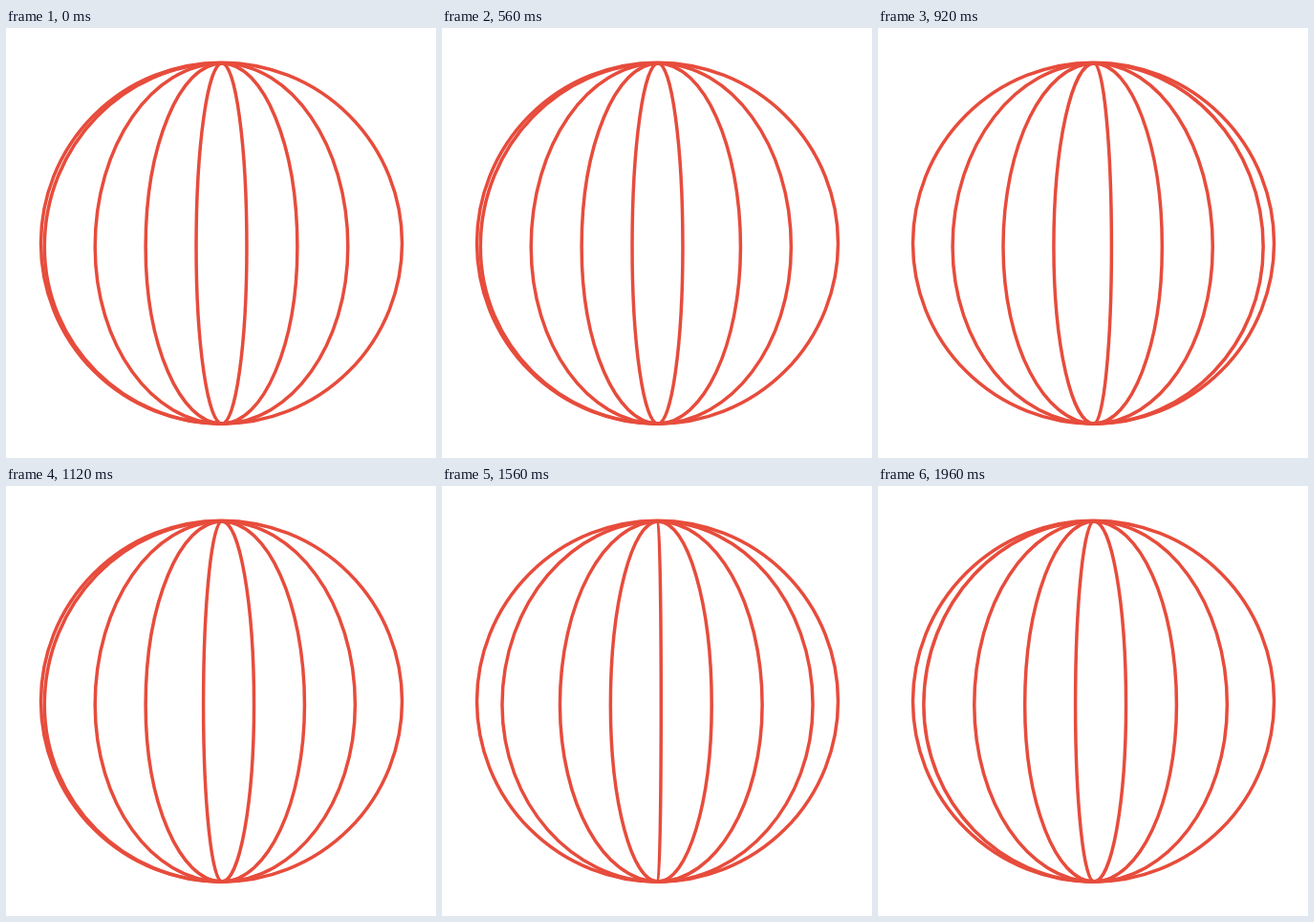
An HTML page with a canvas that plays this animation: 450x450 px, repeating every 2 s.

```html
<!DOCTYPE html>
<html lang="en">
<head>
<meta charset="utf-8">
<title>Turning globe</title>
<style>
  html, body { margin: 0; width: 100%; height: 100%; overflow: hidden; background: #fff; }
  canvas { display: block; }
</style>
</head>
<body>
<canvas id="stage" width="450" height="450"></canvas>
<script>
const ctx = document.getElementById('stage').getContext('2d');

const STEPS = 50, STEP_MS = 40;   // one loop lasts 2000 ms
const LINES = 7, STAGGER = 7;     // seven meridians, seven steps apart
const CX = 225.5, CY = 225.2, R = 189;
const POLE = 226, TOP = 37, BOTTOM = 414, WAIST = 229;
const KAPPA = 0.5523;

function meridian(x) {
  const bulge = POLE + (x - POLE) * KAPPA;
  const up = WAIST - (WAIST - TOP) * KAPPA;
  const down = WAIST + (BOTTOM - WAIST) * KAPPA;
  ctx.beginPath();
  ctx.moveTo(POLE, TOP);
  ctx.bezierCurveTo(bulge, TOP, x, up, x, WAIST);
  ctx.bezierCurveTo(x, down, bulge, BOTTOM, POLE, BOTTOM);
  ctx.stroke();
}

function draw(step) {
  ctx.fillStyle = '#fff';
  ctx.fillRect(0, 0, 450, 450);
  ctx.strokeStyle = '#e74c3c';
  ctx.lineWidth = 3.5;
  ctx.beginPath();
  ctx.arc(CX, CY, R, 0, Math.PI * 2);
  ctx.stroke();
  for (let i = 0; i < LINES; i++) {
    // each line sweeps evenly from the right rim to the left rim
    const left = (STEPS - 1 - step + i * STAGGER + 1) % STEPS;
    meridian(CX - R + (left + 0.5) / STEPS * 2 * R);
  }
}

const start = performance.now();
function tick() {
  const t = Math.max(0, performance.now() - start);
  draw(Math.floor(t / STEP_MS) % STEPS);
  requestAnimationFrame(tick);
}
tick();
</script>
</body>
</html>
```
